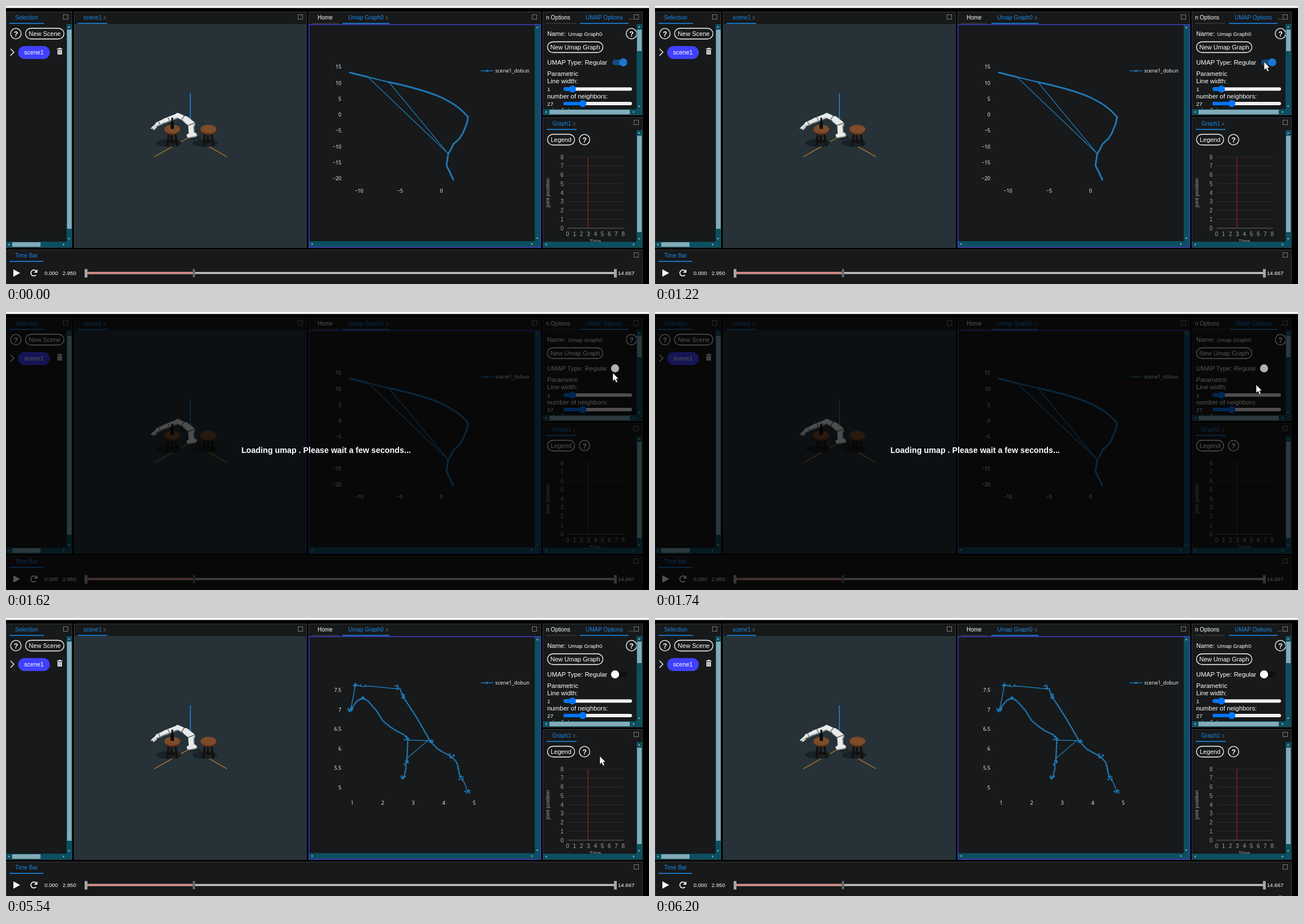
Write an HTML page that moves like this. It is 1137 by 493 pixels and loops after 6.27 s.

```html
<!DOCTYPE html>
<html lang="en">
<head>
<meta charset="utf-8">
<title>Scene viewer</title>
<style>
  html, body { margin: 0; width: 100%; height: 100%; overflow: hidden; background: #000; }
  svg { display: block; width: 100%; height: 100%; }
  text { font-family: "Liberation Sans", Arial, sans-serif; fill: #fff; white-space: pre; }
  .plot text { font: 9px "Open Sans", sans-serif; }
  .tick text { font-size: 10px; fill: #a2a3a4; }
  .line { fill: none; stroke: #1f77b4; stroke-linejoin: round; stroke-linecap: round; }
  .ring { fill: none; stroke: #fff; stroke-width: 1.3; }
  .limb path { fill: none; stroke-linecap: round; }
</style>
</head>
<body>
<svg id="stage" viewBox="0 0 1137 493" preserveAspectRatio="none"></svg>
<script>
const LOOP = 6270;
const BLUE = '#1b87e6', PANEL = '#17191a', TRACK = '#0b4f61', THUMB = '#84abb7';

const rect = (x, y, w, h, fill, extra = '') =>
  `<rect x="${x}" y="${y}" width="${w}" height="${h}" fill="${fill}" ${extra}/>`;
const path = (d, attrs) => `<path d="${d}" ${attrs}/>`;
const text = (x, y, size, s, attrs = '') =>
  `<text x="${x}" y="${y}" font-size="${size}" ${attrs}>${s}</text>`;
const circle = (x, y, r, attrs) => `<circle cx="${x}" cy="${y}" r="${r}" ${attrs}/>`;
const ellipse = (x, y, rx, ry, fill) =>
  `<ellipse cx="${x}" cy="${y}" rx="${rx}" ry="${ry}" fill="${fill}"/>`;
const range = (n, f) => Array.from({ length: n }, (_, i) => f(i)).join('');

const panel = (x, y, w, h) =>
  rect(x + .5, y + .5, w - 1, h - 1, PANEL, 'stroke="#353738"') +
  rect(x + w - 15.5, y + 5.5, 8, 8, 'none', 'stroke="#77797a"');

function tab(x, w, y, label, active, close) {
  const tx = x + 10;
  return text(tx, y + 13.5, 10, label, active ? `style="fill:${BLUE}"` : '') +
    rect(x, y + 20, w, 1.6, active ? BLUE : '#343637') +
    (close ? text(close, y + 13.5, 10, 'x', 'style="fill:#5c5e5f"') : '');
}

function arrow(x, y, turn) {
  return path('M-2 1.2L0 -1.5L2 1.2Z', `fill="#9cc0ca" transform="translate(${x} ${y}) rotate(${turn})"`);
}
const vbar = (x, y, h, ty, th) =>
  rect(x, y, 10, h, TRACK) + (th ? rect(x + 1, ty, 8, th, THUMB) : '') +
  arrow(x + 4.5, y + 5, 0) + arrow(x + 4.5, y + h - 5, 180);
const hbar = (x, y, w, tx, tw) =>
  rect(x, y, w, 10, TRACK) + (tw ? rect(tx, y + 1, tw, 8, THUMB) : '') +
  arrow(x + 5, y + 5, -90) + arrow(x + w - 5, y + 5, 90);

const pill = (x, y, w, label) =>
  rect(x + .5, y + .5, w, 19, 'none', 'rx="9.75" stroke="#fff" stroke-width="1.3"') +
  text(x + w / 2 + .5, y + 13.6, 11, label, 'text-anchor="middle"');
const help = (x, y) => circle(x, y, 9.3, 'class="ring"') +
  text(x, y + 4.5, 12.5, '?', 'text-anchor="middle" font-weight="bold"');

const slider = (y, x) =>
  rect(986, y - 3, 121, 6, '#f0f0f0', 'rx="3"') +
  rect(986, y - 3, x - 986, 6, '#0075ff', 'rx="3"') + circle(x, y, 6.2, 'fill="#0075ff"');

function table(x) {
  return ellipse(x - 6, 243, 22, 7, '#182126') +
    path(`M${x - 6} 224L${x - 9} 249M${x + 5} 224L${x + 9} 249M${x - 1} 224V244M${x - 9} 240H${x + 8}`,
      'stroke="#15110f" stroke-width="4" fill="none"') +
    ellipse(x, 221, 14, 8.2, '#472a18') + ellipse(x, 218.5, 14, 8, '#7b4a29') +
    path(`M${x - 10} 215L${x + 7} 224M${x - 4} 213L${x + 11} 220`, 'stroke="#8c5833" stroke-width="1"');
}

function robot() {
  const parts = [
    ['M323 230L334 228', 7], ['M328 227L327 213', 10], ['M328 209L318 201', 12],
    ['M319 201L304 194', 9], ['M304 194L281 203', 7.5], ['M281 203L268 209', 6.5], ['M268 209L260 216', 4]
  ];
  const layer = (color, dx, dy, k) => `<g transform="translate(${dx} ${dy})" stroke="${color}">` +
    parts.map(([d, w]) => path(d, `stroke-width="${w * k}"`)).join('') + '</g>';
  return '<g class="limb">' + layer('#8f9496', .8, 1, 1) + layer('#e9ebeb', -.4, -.4, .88) +
    path('M311 201L315 195M322 212L332 208M289 203L286 197M272 210L270 205', 'stroke="#62686b" stroke-width="1.4"') +
    path('M263 212L257 217M266 215L261 219', 'stroke="#d8dada" stroke-width="2"') + '</g>';
}

const scene = () =>
  rect(121, 32, 411, 396.5, '#263238') +
  path('M326 155V205', 'stroke="#1d86d8" stroke-width="1.6"') +
  path('M262 267.5L324 232.5', 'stroke="#b47b2c" stroke-width="1.4"') +
  path('M391 267.5L329 232.5', 'stroke="#b47b2c" stroke-width="1.4"') +
  table(294) + table(358) +
  ellipse(333, 234, 11, 3.5, '#1a2429') + robot() +
  path('M292.5 198H295.5V204L297 207V218H291V207L292.5 204Z', 'fill="#0c0d0e"');

const yTicks = (labels, y0, dy) => labels.map((s, i) =>
  text(593, y0 + i * dy + 3.2, 9, s, 'text-anchor="end"')).join('');
const xTicks = (labels, x0, dx) => labels.map((s, i) =>
  text(x0 + i * dx, 330.5, 9, s, 'text-anchor="middle"')).join('');

const seq = (from, step, n) => Array.from({ length: n }, (_, i) => String(from + i * step).replace('-', '−'));

function regularPlot() {
  const head = 'M608 118L640 126', mid = 'M640 126L677 135';
  const tail = 'M677 135C706 141 735 148 765 160C787 170 803 180 817 197L815 208L808 225L802 235L791 245L787 254L782 262L780 275L779 283L785 295L791 308';
  return '<g id="before">' + yTicks(seq(15, -5, 8), 108, 28.3) + xTicks(seq(-10, 5, 3), 624, 73) +
    path(head + tail, 'class="line" stroke-width="3"') +
    path(mid, 'class="line" stroke-width="1.6"') +
    path(mid, 'class="line" stroke-width="2.8" stroke-dasharray="0 3.6"') +
    path('M640 126L782 262L677 135', 'class="line" stroke-width="1.3"') + '</g>';
}

function parametricPlot() {
  const upper = 'M607 166L611 155L615 134L618 119L630 121.5L645 121L685 125L697 126L702 140L711 153L727 178L742 204L750 218L763 232L775 239L788 246L797 256L800 264L803 283L810 291L815 304L817 308';
  const lower = 'M607 166L611 160L622 146L631 142L640 147L655 164L666 182L678 192L690 200L704 207L709 213L710.5 217L709 249L707 257L707 268L703 285';
  const clusters = [[619, 120], [693, 123], [609, 162], [804, 284], [816, 306], [703, 284], [708, 212], [707, 256], [789, 245], [751, 219], [631, 143], [702, 138]];
  let seed = 11;
  const rnd = () => (seed = seed * 16807 % 2147483647) / 2147483647 - .5;
  const dots = clusters.map(([x, y]) => range(7, () =>
    circle((x + rnd() * 8).toFixed(1), (y + rnd() * 8).toFixed(1), 1.5, 'fill="#1f77b4"'))).join('');
  return '<g id="after">' + yTicks(['7.5', '7', '6.5', '6', '5.5', '5'], 128, 34.5) + xTicks(seq(1, 1, 5), 612, 54) +
    path(upper + lower, 'class="line" stroke-width="1.6"') +
    path('M618 119H645', 'class="line" stroke-width="3" stroke-dasharray="0 9"') +
    path('M697 126L702 140L711 153L727 178L742 204L750 218L763 232L775 239L788 246L797 256L803 283' + lower,
      'class="line" stroke-width="3.2" stroke-dasharray="0 4.6"') +
    path('M710.5 216.5L745.5 217.5L709 249', 'class="line" stroke-width="1.4"') +
    circle(745.5, 217.5, 1.7, 'fill="#1f77b4"') + dots + '</g>';
}

const selection = () =>
  panel(0, 10, 117, 419) + tab(6, 61, 10, 'Selection', true) +
  help(17.5, 49) + pill(34, 39, 68, 'New Scene') +
  path('M8 76L14 82L8 88', 'fill="none" stroke="#fff" stroke-width="1.4"') +
  rect(21.5, 71, 56, 23, '#4040ff', 'rx="11.5"') + text(49.3, 86, 10.8, 'scene1', 'text-anchor="middle"') +
  path('M90 75.5H100V77H90ZM93 74H97V75.5H93ZM91 78H99V86H91Z', 'fill="#dfe0e0"') +
  path('M93.5 79.5V84.5M96.5 79.5V84.5', 'stroke="#444" stroke-width=".8"') +
  vbar(107, 32, 386, 42, 353) + hbar(0, 418, 107, 11, 50) + rect(107, 418, 10, 10, TRACK);

const graphPanel = () =>
  panel(535, 10, 411, 419) + tab(541, 47, 10, 'Home') + tab(595, 83, 10, 'Umap Graph0', true, 671) +
  vbar(935, 33, 384) + hbar(536, 417, 399) + rect(935, 417, 10, 10, TRACK) +
  rect(535.7, 33, 409.8, 394.8, 'none', 'stroke="#403fc4" stroke-width="1.5"') +
  '<g class="plot">' + path('M840 115H861', 'class="line" stroke-width="1.5"') + circle(850.5, 115, 2, 'fill="#1f77b4"') +
  text(865, 118.3, 9, 'scene1_dobun') + regularPlot() + parametricPlot() + '</g>';

const options = () =>
  panel(949, 10, 177, 184) +
  text(955, 23.5, 10, 'n Options') + rect(955, 30, 53, 1.6, '#343637') +
  tab(1015, 86, 10, 'UMAP Options', true) + text(1101, 23.5, 10, '...', 'style="fill:#aaa"') +
  '<g clip-path="url(#optClip)">' +
  text(957, 53, 11.2, 'Name:') + text(994, 52.5, 9.6, 'Umap Graph0') + help(1106, 49) +
  pill(957, 63, 98, 'New Umap Graph') + text(957, 104, 11.35, 'UMAP Type: Regular') +
  rect(1072, 95, 26, 10, '#174a7e', 'rx="5" id="rail"') +
  text(957, 124, 11.35, 'Parametric') + text(957, 137, 11.35, 'Line width:') +
  text(957, 151, 9.8, '1') + slider(147.3, 1001.5) +
  text(957, 163.5, 11.35, 'number of neighbors:') + text(957, 176.5, 9.8, '27') + slider(173, 1020) +
  text(957, 189, 11.35, 'min distance:') + '</g>' +
  vbar(1115, 32, 151, 42, 38) + hbar(950, 183, 165, 961, 142) + rect(1115, 183, 10, 10, TRACK);

const jointGraph = () =>
  panel(949, 197, 177, 232) + tab(956, 53, 198, 'Graph1', true, 1002) +
  pill(957, 227, 48, 'Legend') + help(1023, 237) +
  '<g class="tick" clip-path="url(#jointClip)">' +
  range(9, i => {
    const y = 394 - i * 15.75;
    return rect(993, y - .5, 99, 1, i ? '#2c2e2f' : '#66686a') +
      text(986, y + 3.6, 10, i, 'text-anchor="end"') +
      text(993 + i * 12.3, 408, 10, i, 'text-anchor="middle"');
  }) +
  path('M1029 268V394', 'stroke="#8f1b1b" stroke-width="1.5"') +
  text(1042, 419.5, 9.4, 'Time', 'text-anchor="middle" style="font-size:9.3px"') +
  text(0, 0, 9.4, 'joint position', 'text-anchor="middle" style="font-size:9.4px" transform="translate(961 331) rotate(-90)"') +
  '</g>' + vbar(1115, 220, 198, 230, 171) + hbar(950, 418, 165) + rect(1115, 418, 10, 10, TRACK);

const timeBar = () =>
  panel(0, 432, 1126, 66) + tab(6, 60, 432, 'Time Bar', true) +
  path('M13 467L25 473.5L13 480Z', 'fill="#fff"') +
  path('M53.2 477A5.3 5.3 0 1 1 53 469.6', 'fill="none" stroke="#fff" stroke-width="1.7"') +
  path('M55.5 467V473H49.5Z', 'fill="#fff"') +
  text(68, 477, 9.6, '0.000') + text(100, 477, 9.6, '2.950') + text(1082, 477, 9.6, '14.667') +
  rect(142, 471.7, 935, 3.6, '#bfc0c0') + rect(142, 471.7, 190, 3.6, '#d58f8a') +
  rect(139, 466.5, 5, 15, '#a5a6a6') + rect(330.3, 466.5, 4, 14.5, '#66696a') + rect(1075, 466.5, 5, 15, '#a5a6a6');

const $ = id => document.getElementById(id);

$('stage').innerHTML =
  `<defs><clipPath id="optClip">${rect(950, 33, 165, 150)}</clipPath>` +
  `<clipPath id="jointClip">${rect(950, 220, 165, 198)}</clipPath></defs>` +
  rect(0, 0, 1137, 493, '#000') +
  selection() + panel(120, 10, 412, 419) + tab(127, 52, 10, 'scene1', true, 172) + scene() +
  graphPanel() + options() + jointGraph() + timeBar() +
  rect(1103, 492, 5, 1, '#7d6a1c', 'id="speck"') +
  '<g id="veil">' + rect(0, 4, 1137, 489, '#000', 'opacity=".67"') +
  text(566, 250, 14.28, 'Loading umap . Please wait a few seconds...', 'text-anchor="middle" font-weight="bold"') + '</g>' +
  rect(0, 0, 1137, 3.5, '#f4fcf8') +
  circle(0, 100, 7.2, 'id="knob"') +
  path('M0 0V14.5L3.4 11.4L5.8 17L8.4 15.9L6 10.5H10.3Z', 'id="cursor" fill="#fff" stroke="#111" stroke-width=".6"');

// start, end, count of positions, then a quadratic path: from, bend, to
const moves = [
  [70, 650, 10, [1126, 452], [1122, 215], [1102, 110]],
  [720, 930, 4, [1096, 107], [1086, 102], [1077, 99]],
  [1620, 1740, 3, [1073, 108], [1067, 119], [1063, 129]],
  [5540, 6000, 7, [1050, 245], [1030, 340], [1084, 494]]
];

function cursorAt(t) {
  const move = moves.filter(m => t >= m[0]).pop();
  if (!move) return null;
  const [start, end, n, a, b, c] = move;
  const u = Math.min(1, Math.floor((t - start) / (end - start) * (n - 1) + .05) / (n - 1));
  return a.map((v, i) => (1 - u) ** 2 * v + 2 * u * (1 - u) * b[i] + u * u * c[i]);
}

function knobAt(t) {
  if (t < 1290) return [1091.5, '#1976d2'];
  if (t < 1360) return [1085, '#4f5051'];
  if (t < 1420) return [1079, '#8c8c8c'];
  return [1077, t < 3880 ? '#b0b0b0' : '#fff'];
}

const show = (id, on) => $(id).setAttribute('visibility', on ? 'visible' : 'hidden');

function draw(t) {
  const tip = cursorAt(t), [x, fill] = knobAt(t);
  show('cursor', tip);
  if (tip) $('cursor').setAttribute('transform', `translate(${tip})`);
  $('knob').setAttribute('cx', x);
  $('knob').setAttribute('fill', fill);
  $('rail').setAttribute('fill', t < 1290 ? '#174a7e' : '#0e0f10');
  show('veil', t >= 1290 && t < 3880);
  show('before', t < 3880);
  show('after', t >= 3880);
  show('speck', t >= 6200);
}

const begin = performance.now();
function tick() {
  draw((performance.now() - begin) % LOOP);
  requestAnimationFrame(tick);
}
tick();
</script>
</body>
</html>
```
